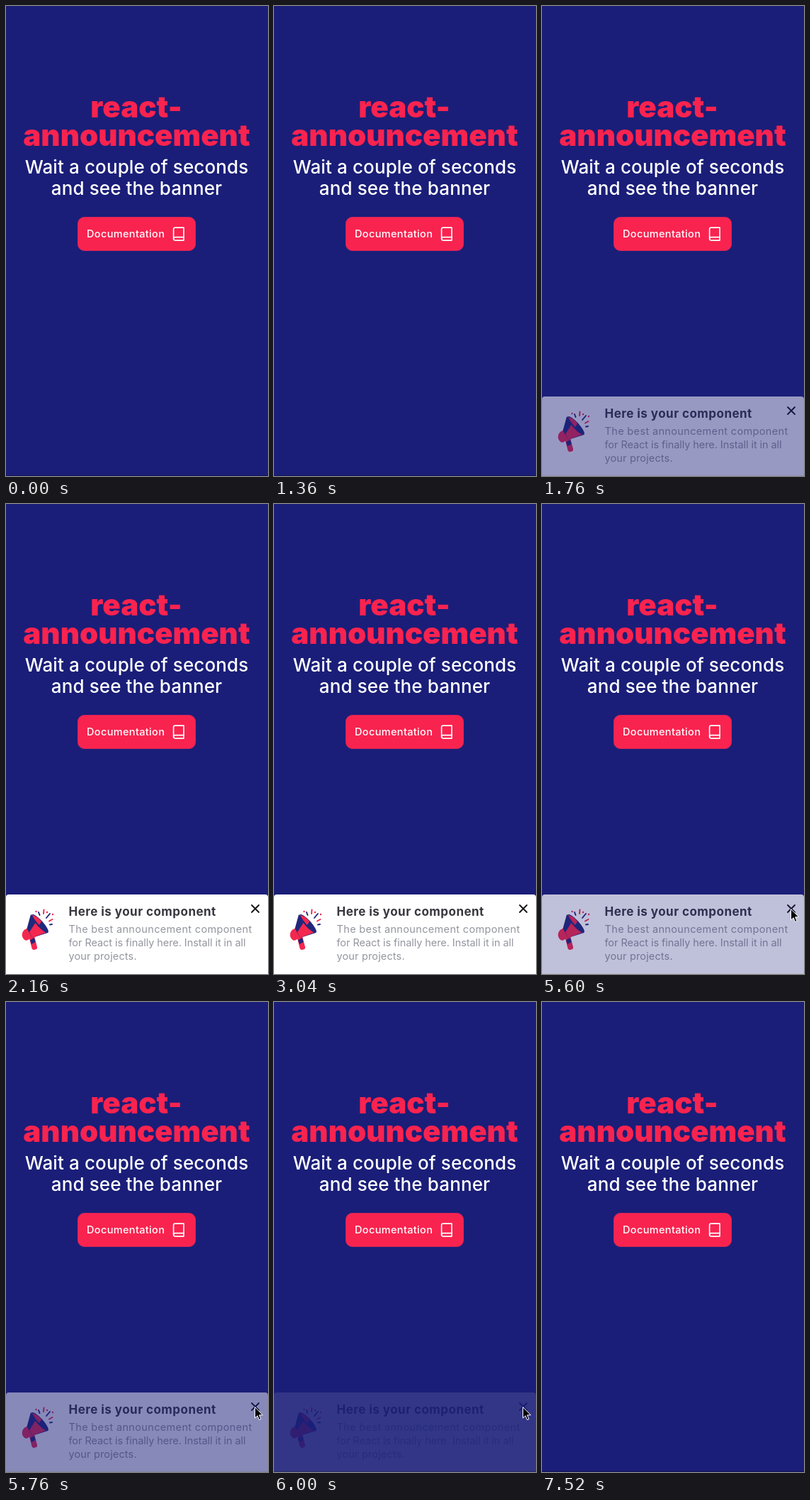
An HTML page that plays this animation: 370 by 662 pixels, repeating every 7.56 s.

```html
<!DOCTYPE html>
<html lang="en">
<head>
<meta charset="utf-8">
<title>react-announcement</title>
<style>
  html, body { margin: 0; width: 100%; height: 100%; overflow: hidden; background: #1a1e78; }
  svg { display: block; }
  text { font-family: Inter, "Open Sans", sans-serif; font-optical-sizing: none; }
  .title { font-size: 42px; font-weight: 900; fill: #f9234f; text-anchor: middle; }
  .lead { font-size: 26px; font-weight: 500; letter-spacing: .12px; fill: #fff; text-anchor: middle; }
  .button { font-size: 14.5px; font-weight: 500; letter-spacing: .35px; fill: #fff; }
  .head { font-size: 17px; font-weight: 700; letter-spacing: .46px; fill: #37373f; }
  .body { font-size: 14.5px; fill: #94969f; }
  .line { fill: none; stroke-linecap: round; stroke-linejoin: round; }
  .red { fill: #f4274f; }
  .navy { fill: #20287c; }
</style>
</head>
<body>
<svg width="370" height="662" viewBox="0 0 370 662">
  <rect width="370" height="662" fill="#1a1e78"/>
  <rect y="661" width="370" height="1" fill="#101350"/>

  <text class="title" x="184" y="157">react-</text>
  <text class="title" x="184.500" y="197">announcement</text>
  <text class="lead" x="184.500" y="236">Wait a couple of seconds</text>
  <text class="lead" x="184.500" y="266">and see the banner</text>

  <rect x="101.500" y="297.500" width="166" height="47" rx="9" fill="#f9234f" stroke="#d9265a"/>
  <text class="button" x="114" y="326">Documentation</text>
  <g class="line" transform="translate(233 310.300) scale(.9)" stroke="#fff" stroke-width="1.800">
    <path d="M4 19.5A2.5 2.5 0 0 1 6.5 17H20"/>
    <path d="M6.5 2H20v20H6.5A2.5 2.5 0 0 1 4 19.5v-15A2.5 2.5 0 0 1 6.5 2z"/>
  </g>

  <g id="banner" opacity="0">
    <path d="M0 662V554Q0 550 4 550H366Q370 550 370 554V662Z" fill="#fff"/>

    <!-- megaphone -->
    <path class="red" d="M33 612L40 609L44 624Q44.500 627 41.500 627.500L39.500 628Q37 628 36.500 626Z"/>
    <path class="navy" d="M34 614L40 611L41.500 617L36 620Z"/>
    <path class="red" d="M31 597L38 610L30 614.500Q26 615.500 23.500 610.500T25.500 600Z"/>
    <path class="navy" d="M29.500 598L35 578L59 604L37 611Z"/>
    <path class="red" d="M33 603L44 586L58 603L37 611Z"/>
    <ellipse class="navy" cx="48" cy="591" rx="4.500" ry="17" transform="rotate(-42 48 591)"/>
    <path class="red" d="M37 579Q44 580 50 588L47 593Q40 586 37 579Z"/>
    <g class="line" stroke-width="1.900">
      <path stroke="#20287c" d="M46 575L47.500 579M62 577L57 583M65 592L62 592.500"/>
      <path stroke="#f4274f" d="M53.500 571.500L53 577M65.500 585L61 587.500"/>
    </g>
    <g class="red">
      <circle cx="42.500" cy="574" r="1.200"/><circle cx="58" cy="575" r="1.200"/>
      <circle cx="66" cy="578" r="1.200"/>
    </g>

    <text class="head" x="88.500" y="580">Here is your component</text>
    <g class="body">
      <text x="88.500" y="604" letter-spacing=".35">The best announcement component</text>
      <text x="88.500" y="623" letter-spacing="-.07">for React is finally here. Install it in all</text>
      <text x="88.500" y="642" letter-spacing=".15">your projects.</text>
    </g>
    <path class="line" d="M347 565L357 575M357 565L347 575" stroke="#111" stroke-width="1.800"/>
  </g>

  <path id="cursor" d="M0 0V15.500L3.600 12.200L6 18L8.500 17L6.100 11.300H11Z"
    fill="#000" stroke="#fff" stroke-width="1" stroke-linejoin="round" transform="translate(400 575)"/>
</svg>
<script>
  const LOOP = 7560;
  const banner = document.getElementById('banner');
  const cursor = document.getElementById('cursor');

  // time, x, y of the pointer tip
  const path = [
    [3280, 372, 575], [3700, 346.5, 570], [4350, 346.5, 570],
    [4550, 351.5, 570.5], [6930, 351.5, 570.5], [7250, 373, 571]
  ];

  const ramp = (t, start, end) => Math.min(1, Math.max(0, (t - start) / (end - start)));
  const smooth = p => p * p * (3 - 2 * p);

  function pointer(t) {
    let [, x, y] = path[0];
    for (let i = 1; i < path.length; i++) {
      const [t0, x0, y0] = path[i - 1], [t1, x1, y1] = path[i];
      const p = smooth(ramp(t, t0, t1));
      x += (x1 - x0) * p;
      y += (y1 - y0) * p;
    }
    return `translate(${x} ${y})`;
  }

  function draw() {
    const t = performance.now() % LOOP;
    banner.setAttribute('opacity', ramp(t, 1420, 2040) - ramp(t, 5420, 6070));
    cursor.setAttribute('transform', pointer(t));
    requestAnimationFrame(draw);
  }
  draw();
</script>
</body>
</html>
```
